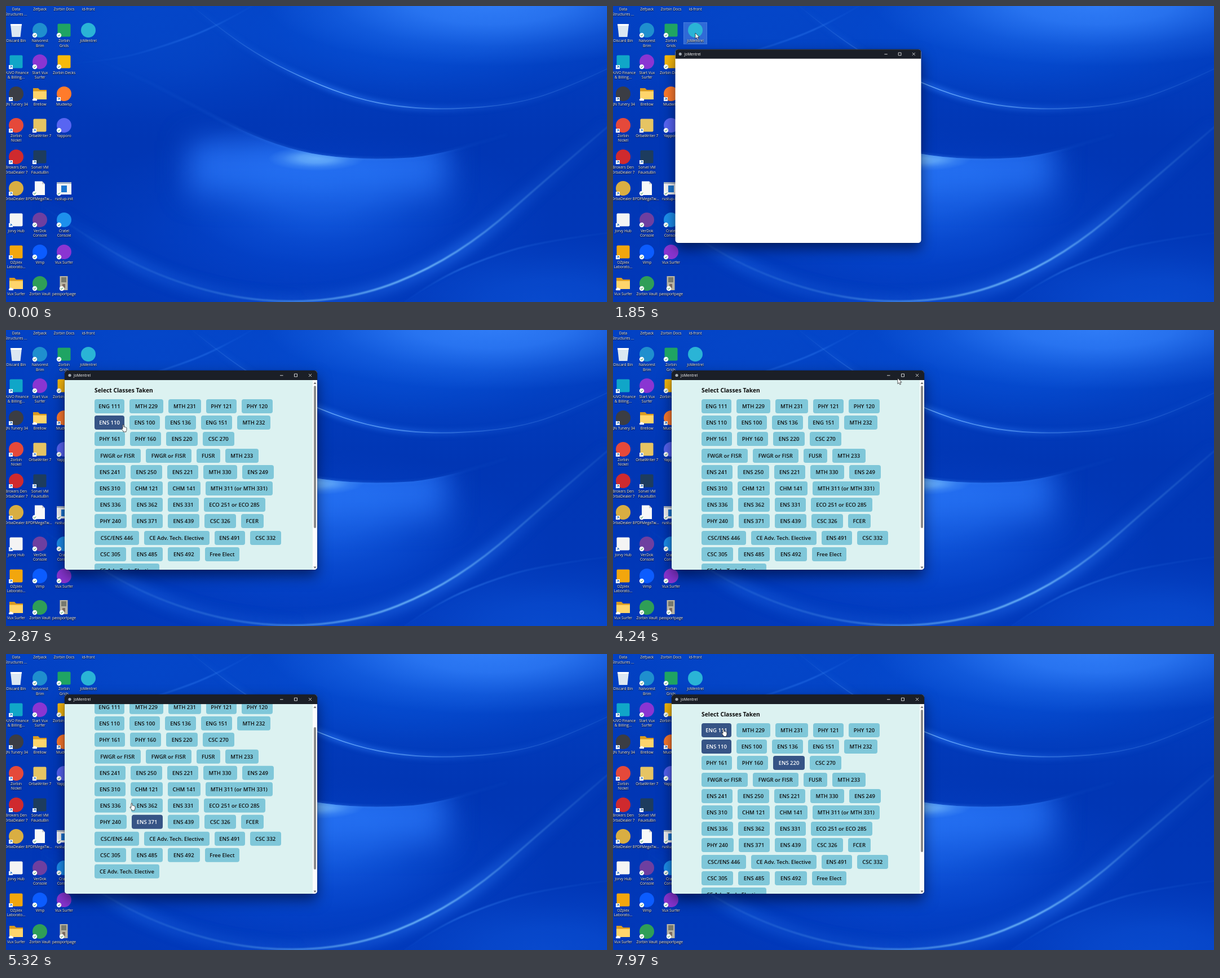
Recreate the animation shown at these times as an HTML page with a canvas. Size 1066 by 526 pixels, loop 8 s.

```html
<!DOCTYPE html>
<html lang="en">
<head>
<meta charset="utf-8">
<title>Class picker demo</title>
<style>
html, body { margin: 0; width: 100%; height: 100%; overflow: hidden; background: #0138b8; }
body { position: relative; font-family: "Open Sans", "Noto Sans", sans-serif; }
canvas, .icon, #win, #cursor, #page *, .label { position: absolute; }
canvas { left: 0; top: 0; }
.icon { width: 42px; box-sizing: border-box; }
.icon svg { position: absolute; left: 0; top: 0; overflow: visible; }
.icon.hover { background: rgba(150, 195, 255, .3); box-shadow: inset 0 0 0 .5px rgba(190, 220, 255, .35); }
.icon.picked { background: rgba(160, 200, 255, .4); }
.label { left: 50%; top: 29.2px; transform: translateX(-50%); white-space: pre; text-align: center;
  font-size: 6.6px; line-height: 8.5px; color: #fff; text-shadow: 0 .5px 1px #000, 0 0 1.5px rgba(0, 0, 0, .7); }
#win { left: 103.5px; top: 72px; width: 448.5px; height: 354px; border-radius: 5px;
  box-shadow: 0 11px 24px rgba(0, 0, 20, .55), 0 0 2px rgba(0, 0, 0, .6); }
#frame { position: absolute; inset: 0; overflow: hidden; border-radius: 5px; background: #fff; }
#bar { position: absolute; left: 0; top: 0; width: 100%; height: 17px; background: #1b1f27; color: #fff;
  font-size: 6.7px; line-height: 17px; text-indent: 16.5px; }
#bar svg, #scroll svg { position: absolute; left: 0; top: 0; }
#view { position: absolute; left: 0; top: 17px; width: 440.5px; height: 337px; overflow: hidden; background: #dcf2f1; }
#page { position: absolute; left: -103.5px; top: -89px; }
#page div { white-space: nowrap; }
.heading { left: 157px; top: 98.5px; font: 700 10.3px/16px "Open Sans", sans-serif; color: #0a0a0a; }
.course { height: 25px; border-radius: 4px; background: #7fc7d9; color: #111; text-align: center;
  font-size: 9.5px; font-weight: 600; line-height: 25px; }
.course.on { background: #365486; color: #fff; }
.action { top: 475px; height: 28.5px; border-radius: 4px; color: #fff; text-align: center;
  font-size: 11.9px; font-weight: 700; line-height: 28.5px; }
#scroll { position: absolute; left: 440.5px; top: 17px; width: 8px; height: 337px; background: #fcfcfc; }
#thumb { position: absolute; left: 1.8px; top: 10px; width: 4.6px; height: 253px; border-radius: 2.3px; background: #8a8a8a; }
#cursor { left: 0; top: 0; overflow: visible; }
</style>
</head>
<body>
<canvas id="wall" width="1066" height="526"></canvas>
<div id="icons"></div>
<div id="win"><div id="frame">
  <div id="bar">JoMentrel
    <svg width="448" height="17" fill="none" stroke="#fff" stroke-width=".8">
      <circle cx="9" cy="8.5" r="2.6" fill="#a5acb5" stroke="none"/>
      <path d="M382 8.8h5.5M407.5 6h5v5h-5zM433 6l5 5m0-5l-5 5"/>
    </svg>
  </div>
  <div id="view"><div id="page"></div></div>
  <div id="scroll"><svg width="8" height="337" fill="#707070"><path d="M1.5 7L4 3.5L6.5 7zM1.5 331.5h5L4 335z"/></svg><div id="thumb"></div></div>
</div></div>
<svg id="cursor" width="12" height="16" stroke-linejoin="round">
  <path id="arrow" d="M0 0V10L2.3 7.9L3.9 11.4L5.6 10.6L4.1 7.2H7.2Z" fill="#fff" stroke="#111" stroke-width=".7"/>
  <path id="hand" d="M-1 .7Q0-.7 1 .7V4.2Q2 3.6 2.8 4.6Q3.8 4.1 4.4 5.1Q5.8 4.8 6 6.2V9Q6 10.6 5 11.6V13H0V11.6L-3 8Q-3.4 6.5-2 6.8L-1 7.7Z" fill="#fff" stroke="#111" stroke-width=".7"/>
</svg>
<script>
const LOOP = 8000, STEP = 68;
const $ = id => document.getElementById(id);

function add(parent, className, text, css = {}) {
  const el = document.createElement('div');
  el.className = className;
  el.textContent = text;
  for (const key in css) el.style[key] = typeof css[key] === 'number' ? css[key] + 'px' : css[key];
  return parent.appendChild(el);
}

// Wallpaper
const g = $('wall').getContext('2d');

function glow(x, y, rx, ry, rgb, alpha) {
  g.save();
  g.translate(x, y);
  g.scale(rx, ry);
  const fill = g.createRadialGradient(0, 0, 0, 0, 0, 1);
  [[0, 1], [.35, .8], [.7, .27], [1, 0]].forEach(([p, a]) => fill.addColorStop(p, `rgba(${rgb},${a * alpha})`));
  g.fillStyle = fill;
  g.fillRect(-1, -1, 2, 2);
  g.restore();
}

function curve(points) {
  const path = new Path2D();
  path.moveTo(...points[0]);
  for (let i = 1; i < points.length - 1; i++) {
    const [x, y] = points[i], [nx, ny] = points[i + 1];
    const last = i === points.length - 2;
    path.quadraticCurveTo(x, y, last ? nx : (x + nx) / 2, last ? ny : (y + ny) / 2);
  }
  return path;
}

function streak(points, width, blur, rgb, alpha, peak) {
  const xs = points.map(p => p[0]);
  const fade = g.createLinearGradient(Math.min(...xs), 0, Math.max(...xs), 0);
  [[0, 0], [peak * .5, .3], [peak, 1], [(1 + peak) / 2, .35], [1, .1]]
    .forEach(([p, a]) => fade.addColorStop(p, `rgba(${rgb},${a * alpha})`));
  g.save();
  g.filter = `blur(${blur}px)`;
  g.strokeStyle = fade;
  g.lineWidth = width;
  g.stroke(curve(points));
  g.restore();
}

function within(points, corners, paint) {
  const region = curve(points);
  corners.forEach(c => region.lineTo(...c));
  g.save();
  g.clip(region);
  paint();
  g.restore();
}

function paintWallpaper() {
  const upper = [[320, -8], [385, 45], [460, 95], [540, 134], [620, 164], [700, 180], [790, 184], [900, 175], [990, 148], [1070, 110]];
  const middle = [[110, 75], [220, 118], [310, 165], [400, 213], [480, 247], [560, 267], [660, 273], [770, 266], [890, 228]];
  const lower = [[50, 345], [130, 402], [250, 472], [390, 517], [520, 528], [640, 512], [750, 468], [850, 404], [950, 315], [1070, 212]];
  const corner = [[700, 530], [760, 488], [850, 448], [950, 418], [1070, 403]];
  const base = g.createLinearGradient(0, 0, 0, 526);
  base.addColorStop(0, '#0241c4');
  base.addColorStop(.45, '#0136b4');
  base.addColorStop(1, '#0138b9');
  g.fillStyle = base;
  g.fillRect(0, 0, 1066, 526);
  glow(280, 60, 300, 150, '8,80,210', .4);
  glow(540, 390, 430, 180, '6,75,215', .6);
  within(upper, [[1070, -9], [320, -9]], () => {
    glow(720, 50, 420, 150, '8,86,222', .6);
    glow(860, -8, 400, 115, '56,134,255', .85);
  });
  within(middle, [[890, 526], [110, 526]], () => {
    g.filter = 'blur(26px)';
    g.fillStyle = 'rgba(38,112,242,.85)';
    g.fillRect(325, 240, 455, 92);
    g.filter = 'none';
    glow(560, 320, 270, 140, '40,120,250', .5);
    glow(550, 271, 85, 22, '125,195,255', .75);
  });
  within(corner, [[1070, 530]], () => glow(960, 530, 320, 125, '14,88,222', .55));
  streak(upper, 10, 4, '50,130,255', .5, .35);
  streak(upper, 1.8, .7, '110,175,255', .85, .33);
  streak([[105, 103], [190, 97], [285, 70], [375, 36], [440, -2]], 2, 1, '60,140,255', .55, .75);
  streak(middle, 4, 2, '60,135,245', .4, .6);
  streak(lower, 26, 9, '40,115,240', .5, .75);
  streak(lower.slice(0, 5), 26, 9, '30,105,235', .35, .35);
  streak(lower, 3, 1, '125,200,255', .9, .68);
  streak(corner, 2, 1, '70,150,255', .55, .3);
}

// Desktop icons: column, row, label, shape, colour, badge
const ICONS = [
  [0, 0, 'Data\nStructures ...'], [1, 0, 'Zefpack'], [2, 0, 'Zorbin Docs'], [3, 0, 'id-front'],
  [0, 1, 'Discard Bin', 'bin'],
  [1, 1, 'Nalvorest\nBrim', 'circle', '#1f8fce', 'tick'],
  [2, 1, 'Zorbin\nGrids', 'square', '#1fa463', 'tick'],
  [3, 1, 'JoMentrel', 'circle', '#2ab4d6'],
  [0, 2, 'QUVO Finance\n& Billing...', 'square', '#10a6c8', 'link'],
  [1, 2, 'Start Vux\nSurfer', 'circle', '#8a35d2', 'tick'],
  [2, 2, 'Zorbin Decks', 'square', '#f8b90b', 'tick'],
  [0, 3, 'QN Tunery 34', 'circle', '#3b3d44', 'link'],
  [1, 3, 'Brellow', 'folder', '', 'cloud'],
  [2, 3, 'Mudwisp', 'circle', '#ff7b2b', 'link'],
  [0, 4, 'Zorbin\nNickel', 'circle', '#e5493a', 'link'],
  [1, 4, 'OrbaWriter 7', 'square', '#e6c463', 'link'],
  [2, 4, 'Yapporo', 'circle', '#5865f2', 'tick'],
  [0, 5, 'Brokers Den\nOrbaDealer 7', 'circle', '#cf2a2e', 'link'],
  [1, 5, 'Sorvel VM\nFauxtuBin', 'square', '#1d3c5e', 'link'],
  [0, 6, 'OrbaDealer 8', 'circle', '#d9ae42', 'link'],
  [1, 6, 'PDFMegaTw...', 'page', '', 'tick'],
  [2, 6, 'rustup-init', 'app', '', 'tick'],
  [0, 7, 'Jorvy Hub', 'square', '#f4f4f4', 'link'],
  [1, 7, 'VerDok\nConsole', 'circle', '#6e3fa0', 'tick'],
  [2, 7, 'Cratel\nConsole', 'circle', '#1d90ed', 'tick'],
  [0, 8, 'OZplex\nLaborato...', 'square', '#f2a60d', 'link'],
  [1, 8, 'Vimp', 'circle', '#0b5cff', 'tick'],
  [2, 8, 'Vux Surfer', 'circle', '#8a35d2', 'tick'],
  [0, 9, 'Vux Surfer', 'folder', '', 'cloud'],
  [1, 9, 'Zorbin Vault', 'circle', '#2f9e57', 'tick'],
  [2, 9, 'passportpage', 'photo', '', 'tick'],
];
const SHAPES = {
  circle: c => `<circle cx="21" cy="14" r="13" fill="${c}"/>`,
  square: c => `<rect x="9.5" y="2.5" width="23" height="23" rx="2" fill="${c}"/>`,
  bin: () => '<path d="M11 3H31L28.5 26H13.5Z" fill="#dbe7f2"/><path d="M11 3H31L30.5 6H11.5Z" fill="#fff"/>',
  folder: () => '<path d="M9 4h9l3 3h12v17H9z" fill="#d99a20"/><path d="M9 9.5h24V24H9z" fill="#ffd56b"/>',
  page: () => '<path d="M12 1.5h13l5 5V26H12z" fill="#f8f8f8"/><path d="M25 1.5v5h5z" fill="#ccc"/>',
  app: () => '<path d="M8 3h26v22H8z" fill="#f5f5f5"/><path d="M8 3h26v3H8z" fill="#a9b5c2"/><path d="M16 9h10v12H16z" fill="#1976d2"/>',
  photo: () => '<path d="M13.5 1h14v25h-14z" fill="#b9b4a2"/><path d="M16 3h9v9h-9z" fill="#77796e"/><path d="M18 15h5v7h-5z" fill="#7b6b62"/>',
};
const BADGES = {
  tick: '<circle cx="12" cy="23" r="4.2" fill="#fff"/><path d="M10 23l1.5 1.6L14.2 21.5" fill="none" stroke="#1d8a3a" stroke-width="1"/>',
  link: '<rect x="8" y="20" width="7" height="7" fill="#fff"/><path d="M9.8 25.2L13 22m-2.7-.2h2.9v2.9" fill="none" stroke="#1565c0" stroke-width="1"/>',
  cloud: '<path d="M8.5 26.2q-1.8-2.7 1.2-3.4q1.2-2.5 3.5-.5q3.8.6 2.7 3.9z" fill="#fff"/>',
};

const icons = ICONS.map(([col, row, label, shape, color, badge]) => {
  const x = [18, 60.3, 103, 146][col] - 21, y = 56.2 * row - 27;
  const height = label.includes('\n') ? 47.5 : 39;
  const el = add($('icons'), 'icon', '', { left: x, top: y, height });
  if (shape) {
    const shift = shape === 'photo' ? 5 : 0;
    el.innerHTML = `<svg width="42" height="30">${SHAPES[shape](color)}<g transform="translate(${shift})">${BADGES[badge] || ''}</g></svg>`;
  }
  add(el, 'label', label);
  return { el, x, y, w: 42, h: height };
});

// Course buttons: label and width, laid out row by row
const ROWS = [
  'ENG 111:53,MTH 229:60,MTH 231:58,PHY 121:54,PHY 120:55',
  'ENS 110:53,ENS 100:54,ENS 136:55,ENG 151:55,MTH 232:59',
  'PHY 161:54,PHY 160:55,ENS 220:56,CSC 270:55.5',
  'FWGR or FISR:81.5,FWGR or FISR:81.5,FUSR:41.5,MTH 233:59.5',
  'ENS 241:54.5,ENS 250:56.5,ENS 221:54.5,MTH 330:60,ENS 249:56',
  'ENS 310:54.5,CHM 121:57.5,CHM 141:57.5,MTH 311 (or MTH 331):119.5',
  'ENS 336:56,ENS 362:56,ENS 331:54.5,ECO 251 or ECO 285:109',
  'PHY 240:56.5,ENS 371:55,ENS 439:56.5,CSC 326:55.5,FCER:40.5',
  'CSC/ENS 446:79,CE Adv. Tech. Elective:115.5,ENS 491:54,CSC 332:55.5',
  'CSC 305:56,ENS 485:56,ENS 492:56.5,Free Elect:61.5',
  'CE Adv. Tech. Elective:115',
];
const courses = [];
add($('page'), 'heading', 'Select Classes Taken');
ROWS.forEach((row, i) => {
  let x = 157;
  const y = 123 + 29.2 * i;
  for (const item of row.split(',')) {
    const [label, width] = item.split(':'), w = +width;
    const el = add($('page'), 'course', label, { left: x, top: y, width: w });
    courses.push({ el, label, x, y, w, h: 25 });
    x += w + 9;
  }
});
add($('page'), 'action', 'Get Classes', { left: 157, width: 86.5, background: '#22c55e' });
add($('page'), 'action', 'Clear', { left: 247.5, width: 48.5, background: '#ef4444' });

// Motion tables: time followed by values
const POINTER = [
  [430, 790, 462], [560, 690, 385], [760, 400, 205], [900, 200, 92], [1000, 112, 54], [1180, 146, 48],
  [2400, 146, 48], [2530, 158, 75], [2720, 200, 150], [2850, 208, 168], [2900, 208, 168],
  [3000, 265, 150], [3220, 474, 94], [3290, 474, 94], [3360, 508, 93], [3540, 508, 93], [3700, 510, 78],
  [3900, 511, 82], [4210, 511, 82], [4320, 400, 150], [4480, 222, 265], [4700, 222, 265], [4860, 223, 265],
  [5490, 223, 265], [5860, 195, 167], [6100, 194.5, 166.5], [6300, 194.5, 166.5], [6470, 235, 195],
  [6700, 285, 234], [6760, 285, 234], [7000, 312, 195], [7250, 312, 195], [7540, 218.5, 131],
  [7600, 218.5, 131], [7690, 214, 116], [7780, 201, 112], [7900, 196, 133.5],
];
const SCROLL = [[4480, 0], [4620, 67.5], [4690, 67.5], [4800, 86], [5120, 86], [5300, 41.3], [5330, 41.3], [5480, 0]];
const OPENING = [[1700, .9, .4], [1830, .97, 1], [2000, 1, 1]];
const CLICKS = { 'ENS 110': 5900, 'ENS 220': 7100 };
const ICON_CLICK = 1310, WINDOW_OPENS = 1700, PAGE_LOADS = 2100, HOVER_LAG = 250;

function at(table, t) {
  const next = table.findIndex(k => k[0] > t);
  if (next === 0) return table[0].slice(1);
  if (next < 0) return table[table.length - 1].slice(1);
  const a = table[next - 1], b = table[next], p = (t - a[0]) / (b[0] - a[0]);
  return a.slice(1).map((v, i) => v + (b[i + 1] - v) * p);
}

const hits = (box, x, y) => x >= box.x && x <= box.x + box.w && y >= box.y && y <= box.y + box.h;

function draw(t) {
  const [x, y] = at(POINTER, t), [scroll] = at(SCROLL, t), [scale, opacity] = at(OPENING, t);
  const loaded = t >= PAGE_LOADS;

  $('win').style.visibility = t >= WINDOW_OPENS ? 'visible' : 'hidden';
  $('win').style.opacity = opacity;
  $('win').style.transform = `scale(${scale})`;
  $('view').style.visibility = $('scroll').style.visibility = loaded ? 'inherit' : 'hidden';
  $('page').style.transform = `translateY(${-scroll}px)`;
  $('thumb').style.transform = `translateY(${scroll / 1.33}px)`;

  for (const icon of icons) {
    const over = t >= 430 && t < 2600 && hits(icon, x, y);
    icon.el.classList.toggle('hover', over);
    icon.el.classList.toggle('picked', over && t >= ICON_CLICK && t < WINDOW_OPENS);
  }

  // Hover catches up with scrolling only after a short delay.
  const [seen] = at(SCROLL, t - HOVER_LAG);
  const hovered = loaded && y > 89 && courses.find(c => hits(c, x, y + seen));
  for (const c of courses) c.el.classList.toggle('on', c === hovered || t >= CLICKS[c.label]);

  $('cursor').style.transform = `translate(${x}px, ${y}px)`;
  $('cursor').style.visibility = t >= 430 ? 'visible' : 'hidden';
  $('arrow').style.display = hovered ? 'none' : '';
  $('hand').style.display = hovered ? '' : 'none';
}

paintWallpaper();
const start = performance.now();
function tick() {
  const t = (performance.now() - start) % LOOP;
  draw(Math.floor(t / STEP) * STEP);
  requestAnimationFrame(tick);
}
tick();
</script>
</body>
</html>
```
